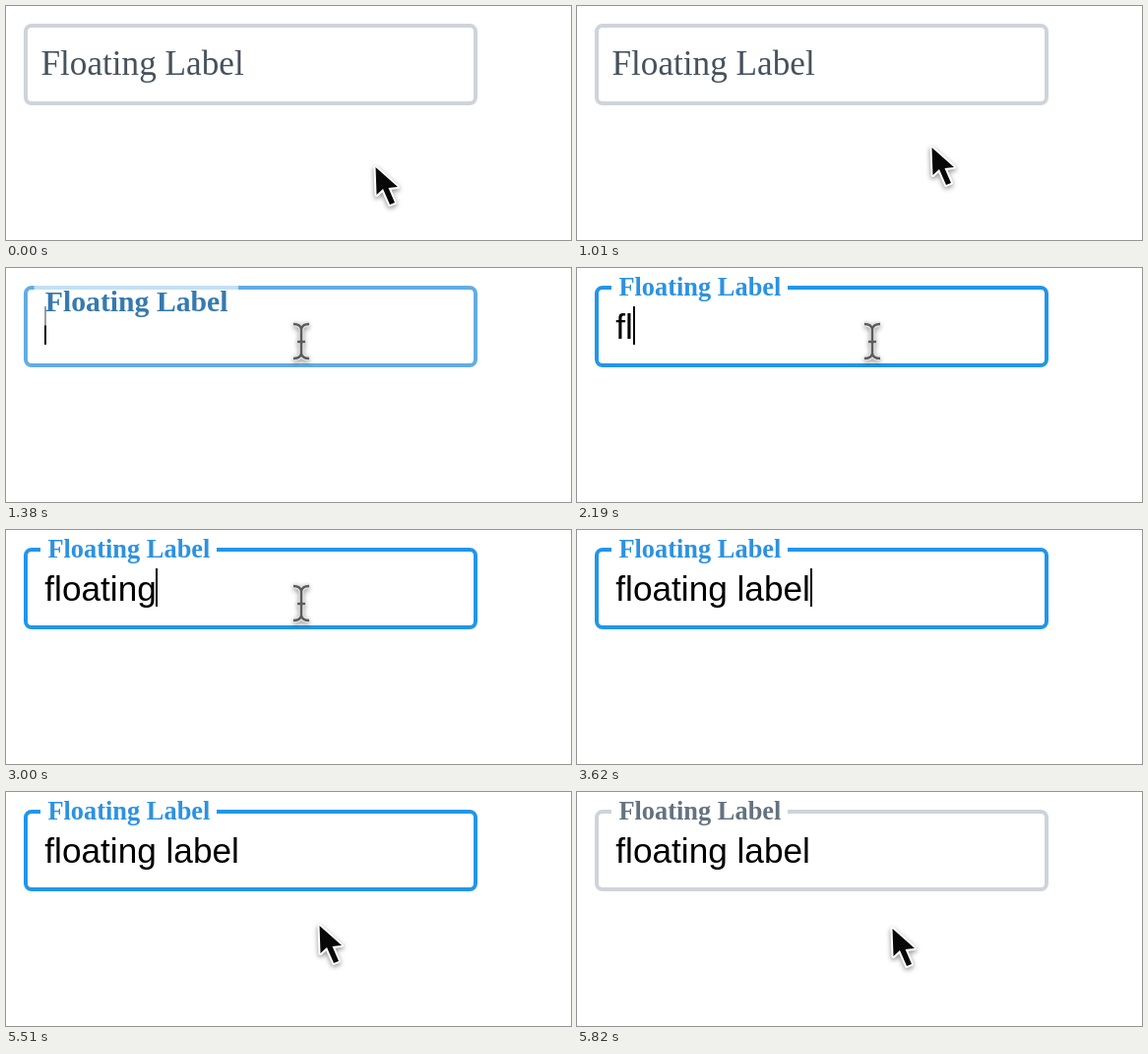
An HTML page with a canvas that plays this animation: 574x238 px, repeating every 6890 ms.

```html
<!DOCTYPE html>
<html lang="en">
<head>
<meta charset="utf-8">
<title>Floating label</title>
<style>
html, body { margin: 0; width: 100%; height: 100%; overflow: hidden; background: #fff; }
canvas { display: block; }
</style>
</head>
<body>
<canvas id="stage" width="574" height="238"></canvas>
<script>
const ctx = document.getElementById('stage').getContext('2d');
const LOOP = 6890;
const FOCUS = 1290, FOCUS_TIME = 250;
const BLUR = 5590, BLUR_TIME = 230;
const TEXT = 'floating label';
const KEYS = [2040, 2190, 2360, 2430, 2680, 2750, 2920, 3000, 3080, 3150, 3230, 3310, 3470, 3620];
const BLINKS = [[FOCUS, 1790], [2040, 4120], [4620, 5200]];
const HIDE = 3390, SHOW = 5350;

// The picture only advances at these moments while things move.
const STEPS = [1010, 1080, 1150, 1230, 1300, 1380, 1470, 1540, 5350, 5420, 5510, 5580, 5660, 5740, 5820];

// time, x, y
const PATH = [
  [0, 375, 163], [1009, 375, 163], [1010, 360, 143], [1080, 339, 116],
  [1150, 318, 92], [1230, 303, 78], [1300, 300, 75], [5300, 300, 75],
  [5350, 304, 88], [5420, 312, 117], [5510, 318, 135], [5580, 320, 138], [LOOP, 320, 138]
];

const GREY = [205, 212, 218], BLUE = [33, 150, 233];
const INK = [70, 82, 92], LABEL_BLUE = [44, 146, 226], LABEL_GREY = [100, 115, 129];

const clamp = v => Math.max(0, Math.min(1, v));
const mix = (a, b, p) => a + (b - a) * p;
const blend = (a, b, p) => `rgb(${a.map((v, i) => Math.round(mix(v, b[i], p)))})`;

// cubic-bezier(.25, .1, .25, 1)
function ease(x) {
  if (x <= 0 || x >= 1) return clamp(x);
  let lo = 0, hi = 1;
  const curve = (u, a, b) => 3 * u * (1 - u) ** 2 * a + 3 * u * u * (1 - u) * b + u ** 3;
  for (let i = 0; i < 24; i++) {
    const mid = (lo + hi) / 2;
    if (curve(mid, .25, .25) < x) lo = mid; else hi = mid;
  }
  return curve(lo, .1, 1);
}

function snap(t) {
  if (t < STEPS[0] || t >= 1540 && t < SHOW) return t;
  return STEPS.filter(s => s <= t).pop();
}

function mouseAt(t) {
  const i = PATH.findIndex(p => p[0] > t);
  const a = PATH[i - 1], b = PATH[i];
  const p = (t - a[0]) / (b[0] - a[0]);
  return [mix(a[1], b[1], p), mix(a[2], b[2], p)];
}

function drawField(t) {
  ctx.font = '35.2px "Liberation Sans", Arial, sans-serif';
  const typed = TEXT.slice(0, KEYS.filter(k => k <= t).length);
  ctx.fillStyle = '#000';
  ctx.fillText(typed, 39.3, 71.5);
  if (BLINKS.some(([on, off]) => t >= on && t < off)) {
    ctx.fillRect(Math.round(39 + ctx.measureText(typed).width), 39, 2, 39);
  }
}

function drawLabel(rise, blur) {
  // white patch behind the label that fades in over the border
  const left = mix(18, 35, rise), right = mix(272, 214, rise);
  const top = mix(40, 2, rise), bottom = mix(97, 35, rise);
  ctx.fillStyle = `rgba(255,255,255,${rise})`;
  ctx.fillRect(left, top, right - left, bottom - top);

  const weight = rise > 1 / 3 ? 'bold' : 'normal';
  ctx.font = `${weight} ${mix(35.2, 26.4, rise)}px "Liberation Serif", "Times New Roman", serif`;
  ctx.fillStyle = blur ? blend(LABEL_BLUE, LABEL_GREY, blur) : blend(INK, LABEL_BLUE, rise);
  ctx.fillText('Floating Label', mix(35.5, 42.4, rise), mix(70, 28, rise));
}

function drawArrow() {
  const shape = new Path2D('M.5 1 L1.5 29 L8 23 L15 39 L20 37 L13.5 22 L23 21 Z');
  ctx.lineJoin = 'round';
  ctx.shadowColor = 'rgba(0,0,0,.45)';
  ctx.shadowBlur = 5;
  ctx.shadowOffsetY = 2;
  ctx.strokeStyle = '#fff';
  ctx.lineWidth = 4;
  ctx.stroke(shape);
  ctx.shadowColor = 'transparent';
  ctx.fillStyle = '#080808';
  ctx.fill(shape);
}

function drawBeam() {
  const shape = new Path2D('M-8 -18 Q-1 -18 0 -13 Q1 -18 8 -18 M0 -13 V13 M-8 17 Q-1 17 0 12 Q1 17 8 17 M-4 0 H4');
  ctx.shadowColor = 'rgba(0,0,0,.4)';
  ctx.shadowBlur = 5;
  ctx.shadowOffsetY = 2;
  ctx.strokeStyle = '#e8e8e8';
  ctx.lineWidth = 5;
  ctx.stroke(shape);
  ctx.shadowColor = 'transparent';
  ctx.strokeStyle = '#5c5c5c';
  ctx.lineWidth = 2.5;
  ctx.stroke(shape);
}

function drawMouse(t) {
  if (t >= HIDE && t < SHOW) return;
  const [x, y] = mouseAt(t);
  ctx.save();
  ctx.translate(x, y);
  if (y < 101) drawBeam(); else drawArrow();
  ctx.restore();
}

function draw(time) {
  const t = snap(time);
  const rise = ease((t - FOCUS) / FOCUS_TIME);
  const blur = ease((t - BLUR) / BLUR_TIME);

  ctx.fillStyle = '#fff';
  ctx.fillRect(0, 0, 574, 238);
  ctx.strokeStyle = blend(GREY, BLUE, rise * (1 - blur));
  ctx.lineWidth = 4;
  ctx.beginPath();
  ctx.roundRect(20, 20, 457, 79, 6);
  ctx.stroke();

  drawField(t);
  drawLabel(rise, blur);
  drawMouse(t);
}

const start = performance.now();
function tick() {
  draw((performance.now() - start) % LOOP);
  requestAnimationFrame(tick);
}
tick();
</script>
</body>
</html>
```
